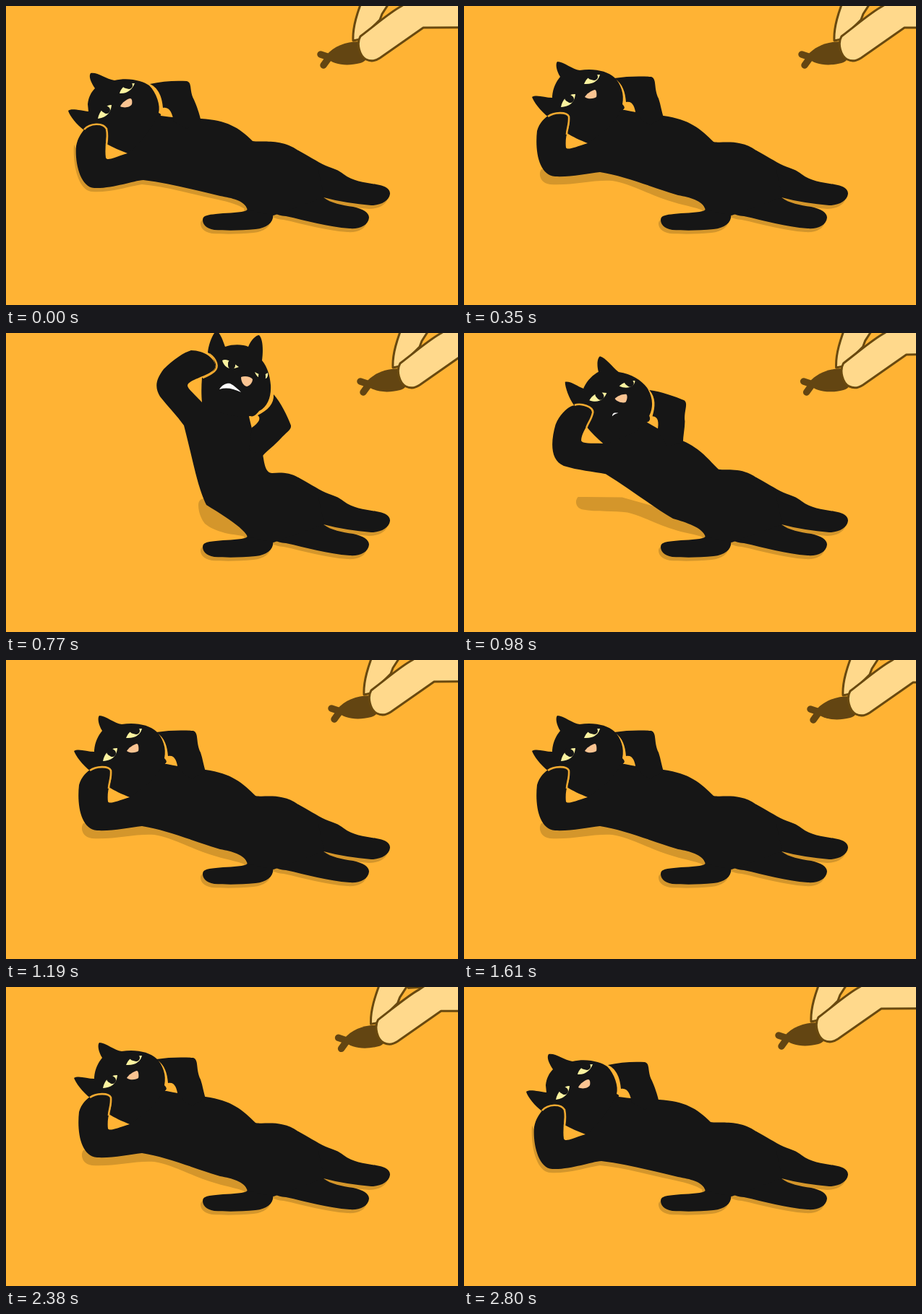
An HTML page that plays this animation: 625 by 414 pixels, repeating every 2.87 s.

```html
<!DOCTYPE html>
<html lang="en">
<head>
<meta charset="utf-8">
<title>Cat sit-ups</title>
<style>
html, body { margin: 0; width: 100%; height: 100%; overflow: hidden; background: #ffb334; }
svg { display: block; width: 625px; height: 414px; }
.fur { fill: #161616; }
.shade { fill: #d4962b; }
.eye { fill: #fbf3a0; }
.skin { fill: #ffd98c; stroke: #69490f; stroke-width: 3; stroke-linejoin: round; }
.fish { fill: #634512; }
.tail { fill: none; stroke: #634512; stroke-width: 9.5; stroke-linecap: round; }
</style>
</head>
<body>
<svg viewBox="0 0 625 414">
  <defs>
    <path id="legs" d="M404 200C418 207 429 215 442 221C452 225 460 227 467 233C480 243 496 244 512 247C526 249 531 254 531 260C530 270 518 276 505 276C483 274 461 271 439 265C449 273 465 276 480 278C494 281 502 286 502 293C501 304 489 309 475 308C445 306 415 297 387 291C380 291 375 288 369 287C371 299 362 307 345 309C325 311 305 311 288 310C276 308 272 302 272 296C272 290 280 289 290 288C303 286 319 287 330 284C334 283 335 281 332 278L345 228Z"/>
  </defs>
  <use href="#legs" class="shade" x="-3" y="5"/>
  <path id="shadow" class="shade"/>
  <use href="#legs" class="fur"/>
  <path id="body" class="fur"/>
  <path id="arm" class="fur"/>
  <path id="head" class="fur"/>
  <path id="paw" fill="none" stroke="#f0a930" stroke-width="2.6"/>
  <path id="eye1" class="eye"/>
  <path id="eye2" class="eye"/>
  <path id="pupil1" stroke="#161616" stroke-linecap="round" stroke-width="10"/>
  <path id="pupil2" stroke="#161616" stroke-linecap="round" stroke-width="10"/>
  <path id="nose" fill="#fac492"/>
  <path id="mouth" fill="#fff"/>
  <g id="hand">
    <path class="tail" d="M435 67L447 71L439 82"/>
    <path class="fish" d="M443 68C455 54 475 47 499 50C506 60 502 76 490 79C470 84 453 81 443 72Z"/>
    <path class="skin" d="M524 -20L532 -2L549 -3L570 -20Z"/>
    <path class="skin" d="M497 -20C485 10 479 30 480 48L490 46L517 19L520 11L540 -20Z"/>
    <path class="skin" d="M576 -20L547 0C532 8 516 22 490 42C484 52 489 70 498 74C504 77 511 76 517 72L577 30L720 29L720 -20Z"/>
  </g>
</svg>
<script>
const STEP = 70, LOOP = 2870;
const PIVOT = [330, 250];

// Each part: lying, lifted, sitting
const parts = {
  shadow: [
    'M338 287C326 275 306 271 293 268C258 261 222 250 188 247C172 249 145 259 119 257C100 256 92 220 94 192L112 225L190 228L340 262Z',
    'M338 287C326 279 306 277 291 272C258 263 232 246 205 242C180 240 150 249 119 247C106 246 102 233 107 226L120 225L188 222L340 262Z',
    'M338 284C326 280 312 279 303 277C290 273 282 270 275 264C270 258 266 248 266 238C266 230 272 229 276 229L280 232L290 240L340 262Z'
  ],
  body: [
    'M334 282C330 269 312 266 296 263C262 255 225 245 190 241C175 242 148 253 122 252C102 251 95 215 97 194C99 182 106 173 112 167C120 161 137 162 139 169C140 180 136 196 138 210C140 215 148 210 168 204C162 180 180 150 214 152C235 155 250 156 270 156C305 158 322 168 341 187C352 189 380 183 404 200L430 218L440 265L370 290Z',
    'M334 282C330 269 312 265 296 262C262 252 222 235 188 230C170 232 148 237 126 236C103 234 98 200 101 173C104 162 112 154 118 151C126 147 144 147 145 155C146 168 139 180 141 196C143 200 152 196 171 190C166 165 190 142 222 144C240 148 255 150 276 152C312 157 327 170 345 188C356 191 380 183 404 200L430 218L440 265L370 290Z',
    'M334 282C329 270 298 251 277 238C264 210 260 182 246 128C236 114 224 102 213 88C206 76 206 66 218 50C232 36 246 27 256 24C276 24 292 38 289 48C285 59 251 64 251 73C252 78 261 85 271 96C285 90 320 95 335 112C338 122 341 145 355 168C357 178 358 194 368 194C380 193 392 193 404 200L430 218L440 265L370 290Z'
  ],
  arm: [
    'M199 108C215 104 235 103 250 104C258 106 253 118 260 130C264 139 267 148 270 160L250 170L232 160C230 148 226 139 217 141C216 128 212 114 199 108Z',
    'M208 100C225 97 245 97 259 98C267 101 262 114 269 128C272 137 273 145 276 155L256 165L238 151C236 139 233 131 224 133C223 120 220 108 208 100Z',
    'M370 85C380 96 389 115 394 128C395 134 387 138 380 146C371 156 362 162 355 170L336 162L340 131C350 124 353 118 348 114C362 107 371 98 370 85Z'
  ],
  head: [
    'M113 136C114 126 118 119 123 114C117 105 114 97 117 93C126 91 138 101 150 103C170 98 190 104 198 110C208 120 214 138 211 148C218 151 212 153 208 155C190 190 168 204 168 204C158 200 148 196 139 191C140 182 142 170 136 166C125 163 115 166 108 172C98 165 88 152 86 145C90 141 104 145 114 146Z',
    'M122 125C123 113 128 104 133 98C128 90 126 80 129 77C138 77 150 88 160 89C180 86 198 90 208 99C217 108 222 122 219 136C224 141 222 143 216 146C205 170 171 190 171 190C161 186 150 181 142 176C146 168 147 155 143 151C133 147 125 149 117 154C106 146 96 132 94 126C100 122 112 127 122 127Z',
    'M303 19C315 15 328 16 335 19C339 9 346 3 350 3C355 8 356 22 354 38C362 48 365 60 366 72C367 88 362 102 350 108C347 112 342 117 338 115C320 118 290 112 271 96C270 86 270 74 271 62C282 58 292 50 289 44C288 36 284 30 279 27C280 16 286 0 291 -3C297 0 301 14 303 19Z'
  ],
  paw: [
    'M108 171C116 162 134 161 139 170C141 180 140 186 139 192',
    'M116 153C124 147 142 146 145 153C146 164 142 170 142 178',
    'M281 29C291 36 295 47 288 53C282 58 277 60 272 62'
  ],
  eye1: [
    'M127 156C129 145 137 137 146 137C145 146 141 154 127 156Z',
    'M134 140C136 130 142 122 154 122C153 131 149 139 134 140Z',
    'M299 38C305 34 315 42 322 47C315 50 303 52 299 38Z'
  ],
  eye2: [
    'M157 121C159 113 166 107 178 107C175 115 168 122 157 121Z',
    'M166 108C169 100 175 95 188 95C186 103 179 109 166 108Z',
    'M344 54C350 58 356 60 362 55C364 68 348 66 344 54Z'
  ],
  pupil1: ['M136 142L139 144', 'M144 127L147 129', 'M312 42L312 45'],
  pupil2: ['M166 109L170 110', 'M176 97L180 98', 'M354 59L354 62'],
  nose: [
    'M172 128C168 128 160 134 158 139C164 142 172 140 174 136C175 132 174 128 172 128Z',
    'M181 116C176 117 169 122 167 126C172 130 181 128 183 126C184 122 183 116 181 116Z',
    'M341 64C338 60 330 59 325 61C325 67 328 73 333 74C337 73 341 69 341 64Z'
  ],
  mouth: [
    'M174 150C174 150 174 150 174 150C174 150 174 150 174 150C174 150 174 150 174 150Z',
    'M174 146C174 146 174 146 174 146C174 146 174 146 174 146C174 146 174 146 174 146Z',
    'M295 78C299 71 306 69 310 70C316 73 321 78 325 82C314 77 305 75 295 78Z'
  ]
};

const mix = (a, b, k) => a + (b - a) * k;
const numbers = d => d.match(/-?\d+/g).map(Number);

function swing(x0, y0, x1, y1, k) {
  const [px, py] = PIVOT;
  const r = mix(Math.hypot(x0 - px, y0 - py), Math.hypot(x1 - px, y1 - py), k);
  const a = mix(Math.atan2(py - y0, px - x0), Math.atan2(py - y1, px - x1), k);
  return [px - r * Math.cos(a), py - r * Math.sin(a)];
}

function morph(from, to, k, straight) {
  const a = numbers(from), b = numbers(to), out = [];
  for (let i = 0; i < a.length; i += 2) {
    out.push(...(straight
      ? [mix(a[i], b[i], k), mix(a[i + 1], b[i + 1], k)]
      : swing(a[i], a[i + 1], b[i], b[i + 1], k)));
  }
  let n = 0;
  return from.replace(/-?\d+/g, () => out[n++].toFixed(2));
}

// A lying, B lifted, C and D on the way up, S sitting
const ORDER = 'AABCDSDCBAABCDSDCBAAA';
const RISE = { B: 0, C: 0.3, D: 0.7, S: 1 };
const poses = {};
for (const key of 'ABCDS') {
  poses[key] = {};
  for (const id in parts) {
    const [lying, lifted, sitting] = parts[id];
    poses[key][id] = key === 'A' ? lying
      : key === 'S' ? sitting
      : morph(lifted, sitting, RISE[key], id === 'shadow');
  }
}

// step, x, y
const path = [[0, 0, 0], [5, 32, 0], [11, 55, 0], [17, 15, 0], [23, 44, 1], [29, 46, 4], [35, 20, 3], [40, 0, 0]];

function slope(i, c) {
  const a = path[Math.max(i - 1, 0)], b = path[Math.min(i + 1, path.length - 1)];
  return (b[c] - a[c]) / (b[0] - a[0]);
}

function handAt(f) {
  let i = 0;
  while (i < path.length - 2 && f >= path[i + 1][0]) i++;
  const a = path[i], b = path[i + 1], w = b[0] - a[0], u = (f - a[0]) / w;
  return [1, 2].map(c => {
    const e = u * u * (3 - 2 * u);
    return mix(a[c], b[c], e)
      + w * u * (1 - u) * ((1 - u) * slope(i, c) - u * slope(i + 1, c));
  });
}

const el = id => document.getElementById(id);
let shown = '';

function draw() {
  const f = Math.floor((performance.now() % LOOP) / STEP);
  const key = ORDER[f >> 1];
  if (key !== shown) {
    for (const id in parts) el(id).setAttribute('d', poses[key][id]);
    shown = key;
  }
  el('hand').setAttribute('transform', `translate(${handAt(f)})`);
  requestAnimationFrame(draw);
}
draw();
</script>
</body>
</html>
```
